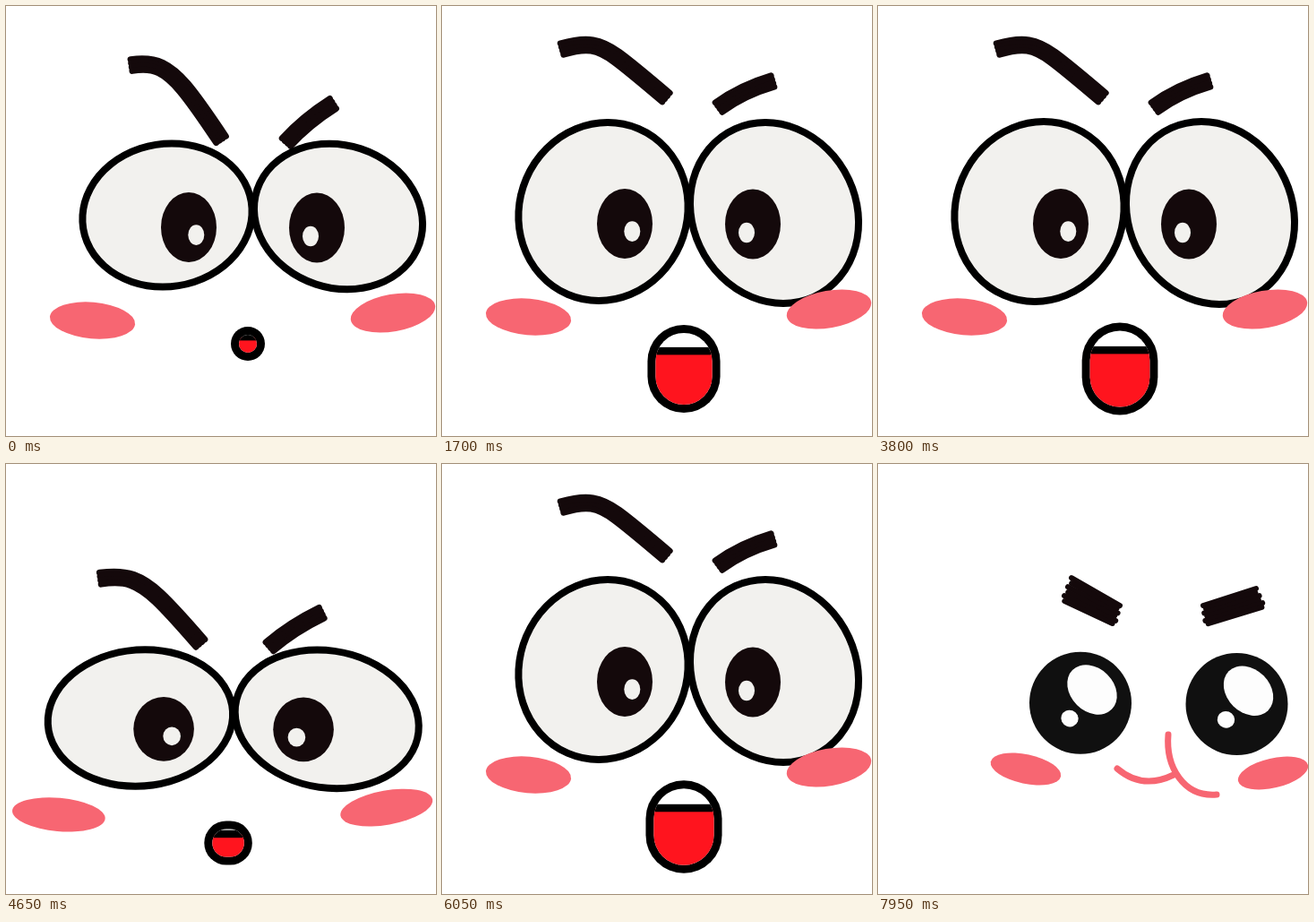
An HTML page with a canvas for the animation above (8 s loop, 480 px wide and 480 px high).

```html
<!DOCTYPE html>
<html lang="en">
<head>
<meta charset="utf-8">
<title>Bouncing face</title>
<style>
  html, body { margin: 0; width: 100%; height: 100%; overflow: hidden; background: #fff; }
  canvas { display: block; width: 100vw; height: 100vh; }
</style>
</head>
<body>
<canvas id="stage" width="480" height="480"></canvas>
<script>
const ctx = document.getElementById('stage').getContext('2d');
const LOOP = 8000, STEP = 50, SHOUT_CYCLE = 2267, SMILE_START = 6800;
const INK = '#14090b', PINK = '#f76672', WHITE = '#f2f1ee', RED = '#ff141e';

const mix = (a, b, k) => a + (b - a) * k;
const mixAll = (a, b, k) => a.map((v, i) => mix(v, b[i], k));

function oval(x, y, rx, ry, angle, fill) {
  ctx.beginPath();
  ctx.ellipse(x, y, rx, ry, angle * Math.PI / 180, 0, Math.PI * 2);
  ctx.fillStyle = fill;
  ctx.fill();
}

function pen(color, width) {
  ctx.strokeStyle = color;
  ctx.lineWidth = width;
  ctx.lineCap = ctx.lineJoin = 'round';
}

// ---------- shouting face ----------

// time, x scale, y scale, y shift, eye opening, mouth opening
const SHOUT = [
  [0, 1, 1, 4, 0, 0],
  [117, 1.091, .918, 73, .15, .2],
  [180, 1.106, .9, 86, .35, .4],
  [283, 1.037, .965, 27, .75, .7],
  [533, .986, 1.024, -17.9, 1.05, 1],
  [867, .998, 1.01, -8, 1.05, .98],
  [1130, 1, 1, 0, 1.05, .95],
  [1417, 1, 1, 0, 1.05, .88],
  [1517, 1, 1, 0, 1.05, .84],
  [1700, 1, 1, 0, 1, .77],
  [2000, 1, 1, 1.5, .6, .45],
  [SHOUT_CYCLE, 1, 1, 4, 0, 0]
];

// Cubic easing through the keys that never overshoots them.
function slope(i, c) {
  const p = SHOUT[i - 1], q = SHOUT[i], r = SHOUT[i + 1];
  if (!p || !r || (q[c] - p[c]) * (r[c] - q[c]) <= 0) return 0;
  const before = (q[c] - p[c]) / (q[0] - p[0]), after = (r[c] - q[c]) / (r[0] - q[0]);
  return 2 * before * after / (before + after);
}

function shoutAt(t) {
  let i = 0;
  while (i < SHOUT.length - 2 && t >= SHOUT[i + 1][0]) i++;
  const a = SHOUT[i], b = SHOUT[i + 1], span = b[0] - a[0], u = (t - a[0]) / span;
  const ease = u * u * (3 - 2 * u);
  return [1, 2, 3, 4, 5].map(c => mix(a[c], b[c], ease)
    + span * (slope(i, c) * u * (1 - u) ** 2 - slope(i + 1, c) * u * u * (1 - u)));
}

const BROWS = [
  { low: [140, 62, 160, 59, 185, 71, 212, 103, 240, 145],
    high: [134, 48, 155, 42, 180, 46, 210, 68, 250, 102] },
  { low: [313, 148, 335, 124, 365, 105], high: [309, 113, 335, 94, 369, 84] }
];

function thickBrow(points) {
  pen(INK, 7);
  for (let k = -1.5; k <= 1.5; k++) {
    const line = points.map(([x, y], i) => {
      const [x0, y0] = points[Math.max(0, i - 1)];
      const [x1, y1] = points[Math.min(points.length - 1, i + 1)];
      const d = Math.hypot(x1 - x0, y1 - y0) / (k * 4.3);
      return [x - (y1 - y0) / d, y + (x1 - x0) / d];
    });
    const last = line.length - 1;
    ctx.beginPath();
    ctx.moveTo(...line[0]);
    for (let i = 1; i < last; i++) {
      const [x, y] = line[i], [nx, ny] = line[i + 1];
      if (i === last - 1) ctx.quadraticCurveTo(x, y, nx, ny);
      else ctx.quadraticCurveTo(x, y, (x + nx) / 2, (y + ny) / 2);
    }
    ctx.stroke();
  }
}

function drawMouth(x, y, w, h) {
  const box = (inset) => {
    ctx.beginPath();
    ctx.roundRect(x - w + inset, y - h + inset, 2 * (w - inset), 2 * (h - inset), Math.min(w, h) - inset);
  };
  const lip = y - Math.min(21, h * .4);
  box(0);
  ctx.fillStyle = '#000';
  ctx.fill();
  ctx.save();
  box(9);
  ctx.clip();
  ctx.fillStyle = '#fff';
  ctx.fillRect(x - w, y - h, 2 * w, 2 * h);
  ctx.fillStyle = RED;
  ctx.fillRect(x - w, lip, 2 * w, 2 * h);
  ctx.fillStyle = '#000';
  ctx.fillRect(x - w, lip - 4.5, 2 * w, 8.5);
  ctx.restore();
}

function drawShout(t) {
  const [sx, sy, shift, open, mouth] = shoutAt(t);
  const X = x => x * sx - 512 * (sx - 1);
  const Y = y => y * sy + shift;
  const spot = (x, y, rx, ry, angle, fill) => oval(X(x), Y(y), rx * sx, ry * sy, angle, fill);

  for (const { low, high } of BROWS) {
    const flat = mixAll(low, high, Math.min(1, open)), points = [];
    for (let i = 0; i < flat.length; i += 2) points.push([X(flat[i]), Y(flat[i + 1])]);
    thickBrow(points);
  }

  const lid = .805 + .195 * open;
  const eye = (x, y, rx, lean, ry) => {
    ctx.save();
    ctx.transform(rx * sx, 0, lean * sx, ry * sy * lid, X(x), Y(y));
    ctx.beginPath();
    ctx.arc(0, 0, 1, 0, Math.PI * 2);
    ctx.restore();
    ctx.fillStyle = WHITE;
    ctx.fill();
    pen('#000', 8);
    ctx.stroke();
  };
  eye(180, 229.5, 94.5, -5, 99.5);
  eye(371, 231, 93.5, 10, 101);

  spot(204, 243, 31, 39, 0, INK);
  spot(347, 243.5, 31, 39, 0, INK);
  spot(212.3, 251.6, 9, 11.3, 0, WHITE);
  spot(340, 253, 9, 11.3, 0, WHITE);
  spot(96.5, 347, 47.7, 20.3, 5, PINK);
  spot(432, 338.5, 47.8, 20.8, -10, PINK);

  drawMouth(X(270), Y(373 + 32 * Math.min(1, mouth / .75)),
    (19 + 28 * mouth) * sx, (19 + 39 * mouth) * sy);
}

// ---------- smiling face ----------

// Two poses of the bounce; all others lie on the line through them.
const LOW = {
  eyes: [220.5, 278.5, 398.5, 279.5], size: [57.5, 55.7, 35],
  cheeks: [158.5, 350.5, 439.5, 356],
  browL: [210, 152, 266, 181, 260, 202, 199, 175],
  browR: [361, 182, 420, 163, 430, 183, 363, 202],
  smile: [263, 350, 292, 374, 327, 357],
  chin: [321, 313, 317, 348, 338, 381, 375, 379]
};
const HIGH = {
  eyes: [226, 266.7, 400.5, 268], size: [57, 57, 45],
  cheeks: [165, 340.5, 441, 345],
  browL: [216, 127, 270, 158, 264, 179, 206, 152],
  browR: [363, 158, 422, 139, 431, 159, 366, 179],
  smile: [267, 340, 295, 364, 330, 347],
  chin: [324, 302, 321, 338, 341, 372, 378, 369]
};

function scribble([ax, ay, bx, by, cx, cy, dx, dy]) {
  pen(INK, 6);
  for (let i = 0; i < 6; i++) {
    const k = i / 5, jag = i % 2 ? .04 : 0;
    const x0 = mix(ax, dx, k), y0 = mix(ay, dy, k);
    const x1 = mix(bx, cx, k), y1 = mix(by, cy, k);
    ctx.beginPath();
    ctx.moveTo(mix(x0, x1, jag), mix(y0, y1, jag));
    ctx.lineTo(mix(x1, x0, jag), mix(y1, y0, jag));
    ctx.stroke();
  }
}

function drawSmile(t) {
  const rise = (1 - Math.cos((t - 625) / 840 * Math.PI * 2)) / 2;
  const k = (rise - .556) / .298;
  const pose = {};
  for (const part in LOW) pose[part] = mixAll(LOW[part], HIGH[part], k);
  const { eyes, cheeks, size: [rx, ry, tilt], smile, chin } = pose;

  scribble(pose.browL);
  scribble(pose.browR);

  for (const i of [0, 2]) {
    const x = eyes[i], y = eyes[i + 1];
    oval(x, y, rx, ry, 0, '#101010');
    oval(x + 13, y - 14.8, 31, mix(22.5, 24, k), tilt, '#fdfdfd');
    oval(x - 12, y + 17.3, 9.7, mix(8.5, 9.3, k), 20, '#fdfdfd');
  }

  oval(cheeks[0], cheeks[1], 40, 16.3, 12, PINK);
  oval(cheeks[2], cheeks[3], 40, 16.5, -13, PINK);

  pen(PINK, 7);
  ctx.beginPath();
  ctx.moveTo(smile[0], smile[1]);
  ctx.quadraticCurveTo(...smile.slice(2));
  ctx.moveTo(chin[0], chin[1]);
  ctx.bezierCurveTo(...chin.slice(2));
  ctx.stroke();
}

const start = performance.now();
function frame() {
  const t = Math.floor((performance.now() - start) % LOOP / STEP) * STEP;
  ctx.fillStyle = '#fff';
  ctx.fillRect(0, 0, 480, 480);
  if (t < SMILE_START) drawShout(t % SHOUT_CYCLE);
  else drawSmile(t - SMILE_START);
  requestAnimationFrame(frame);
}
frame();
</script>
</body>
</html>
```
